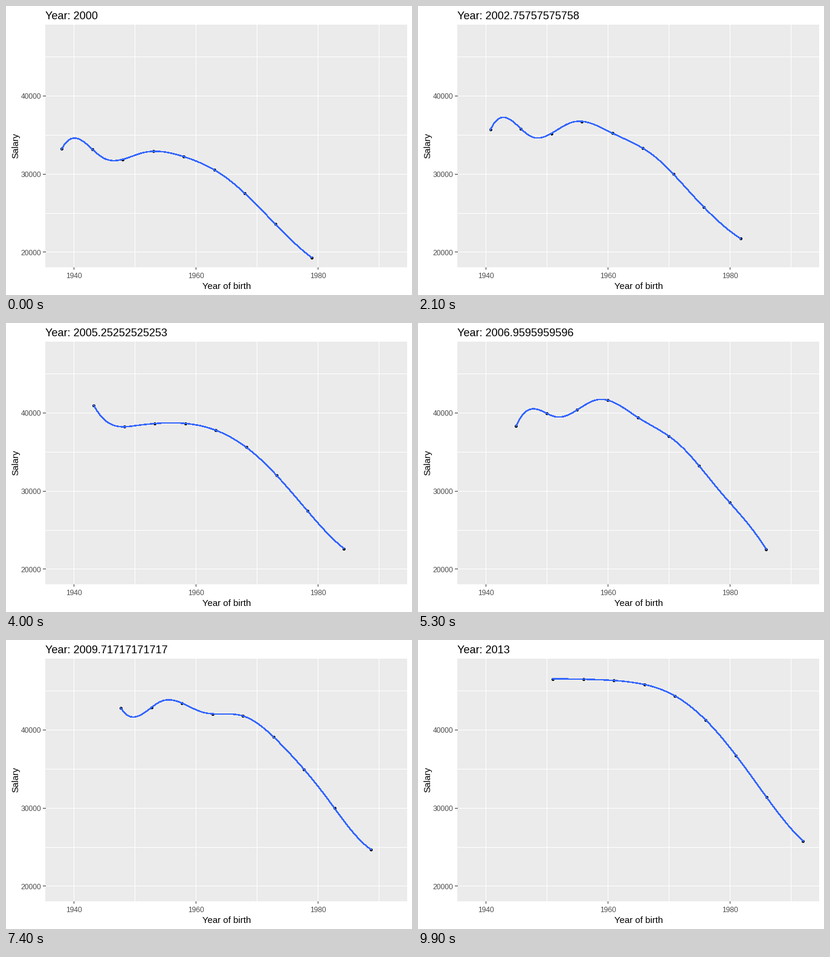
These frames come from a looping animation (672 by 480 pixels, 10 s). A matplotlib script:

```python
import numpy as np
import matplotlib.pyplot as plt
from matplotlib.animation import FuncAnimation
from matplotlib.patches import Rectangle

W, H, DPI = 672, 480, 96
FRAMES, INTERVAL = 100, 100
PX = 72 / DPI
LEFT, RIGHT, TOP, BOTTOM = 65, 664, 31, 433.5

plt.rcParams["font.family"] = "Liberation Sans"

# Birth years in steps of five, the youngest group one year further on
GROUP = np.arange(9)
OFFSET = GROUP * 5 + (GROUP == 8)
GRID = np.linspace(0, OFFSET[-1], 80)
KNOTS = np.quantile(OFFSET, np.arange(1, 6) / 6)

# Good and bad years: group, year, change in thousands
SHOCKS = [(0, 2005, 3.5), (0, 2007, -1.5), (2, 2000, -1.25), (2, 2003, -1),
          (2, 2011, 2.1), (3, 2003, 0.9), (3, 2007, 1.3), (3, 2010, -1.1),
          (8, 2003, 0.7), (8, 2007, -1)]


def basis(x):
    """Cubic spline basis with knots at the data quantiles."""
    x = np.asarray(x, float)[:, None] / 5
    return np.hstack([x ** np.arange(4), np.maximum(x - KNOTS / 5, 0) ** 3])


SMOOTH = basis(GRID) @ np.linalg.inv(basis(OFFSET))


def mix(a, b, t):
    return a + (b - a) * t


def salaries(year):
    """Plateau for the older groups, then a soft knee and a steady fall."""
    t = (year - 2000) / 13
    top, slope, knee = mix(33.2, 46.55, t), mix(4.5, 5.75, t), mix(4.92, 4.39, t)
    values = top - slope * 0.8 * np.log1p(np.exp((GROUP - knee) / 0.8))
    values += 0.6 * np.sin(np.pi * t) * np.tanh(GROUP - 1.7)
    for group, when, change in SHOCKS:
        values[group] += change * max(0, 1 - abs(year - when) / 1.5)
    return values


def to_x(year):
    return 112.3 + (year - 1940) * 10.098


def to_y(thousands):
    return 408.4 - (thousands - 20) * 12.96


fig = plt.figure(figsize=(W / DPI, H / DPI), dpi=DPI, facecolor="white")
ax = fig.add_axes([0, 0, 1, 1])
ax.set(xlim=(0, W), ylim=(H, 0))
ax.axis("off")


def rule(xs, ys, color):
    ax.plot(xs, ys, color=color, lw=PX, antialiased=False,
            solid_capstyle="butt", zorder=2)


def label(x, y, text, size, color="black", **kw):
    return ax.text(x, y, text, fontsize=size * PX, color=color,
                   va="baseline", **kw)


ax.add_patch(Rectangle((LEFT, TOP), RIGHT - LEFT, BOTTOM - TOP,
                       fc="#EBEBEB", lw=0, antialiased=False))

for year in range(1940, 2000, 10):
    x = to_x(year)
    rule([x, x], [TOP, BOTTOM], "white")
    if year % 20 == 0:
        rule([x, x], [BOTTOM, BOTTOM + 3.7], "#333333")
        label(x, 452, year, 12, "#4D4D4D", ha="center")

for k in range(20, 50, 5):
    y = to_y(k)
    rule([LEFT, RIGHT], [y, y], "white")
    if k % 10 == 0:
        rule([LEFT - 3.7, LEFT], [y, y], "#333333")
        label(58.4, y + 5.3, k * 1000, 12, "#4D4D4D", ha="right")

label((LEFT + RIGHT) / 2 + 0.5, 470, "Year of birth", 15, ha="center")
label(20, (TOP + BOTTOM) / 2, "Salary", 15, rotation=90,
      rotation_mode="anchor", ha="center")
title = label(65.2, 22, "", 18.1)

dots, = ax.plot([], [], "o", color="black", ms=5 * PX, mew=0,
                antialiased=False, zorder=3)
curve, = ax.plot([], [], color="#3366FF", lw=1.4 * PX, antialiased=False,
                 solid_joinstyle="round", zorder=4)


def draw(i):
    elapsed = 13 * i / (FRAMES - 1)
    year = 2000 + elapsed
    values = salaries(year)
    first = 1938 + elapsed
    dots.set_data(to_x(first + OFFSET), to_y(values))
    curve.set_data(to_x(first + GRID), to_y(SMOOTH @ values))
    title.set_text(f"Year: {year:.15g}")
    return dots, curve, title


anim = FuncAnimation(fig, draw, frames=FRAMES, interval=INTERVAL,
                     repeat=True, repeat_delay=0)
plt.show()
```
